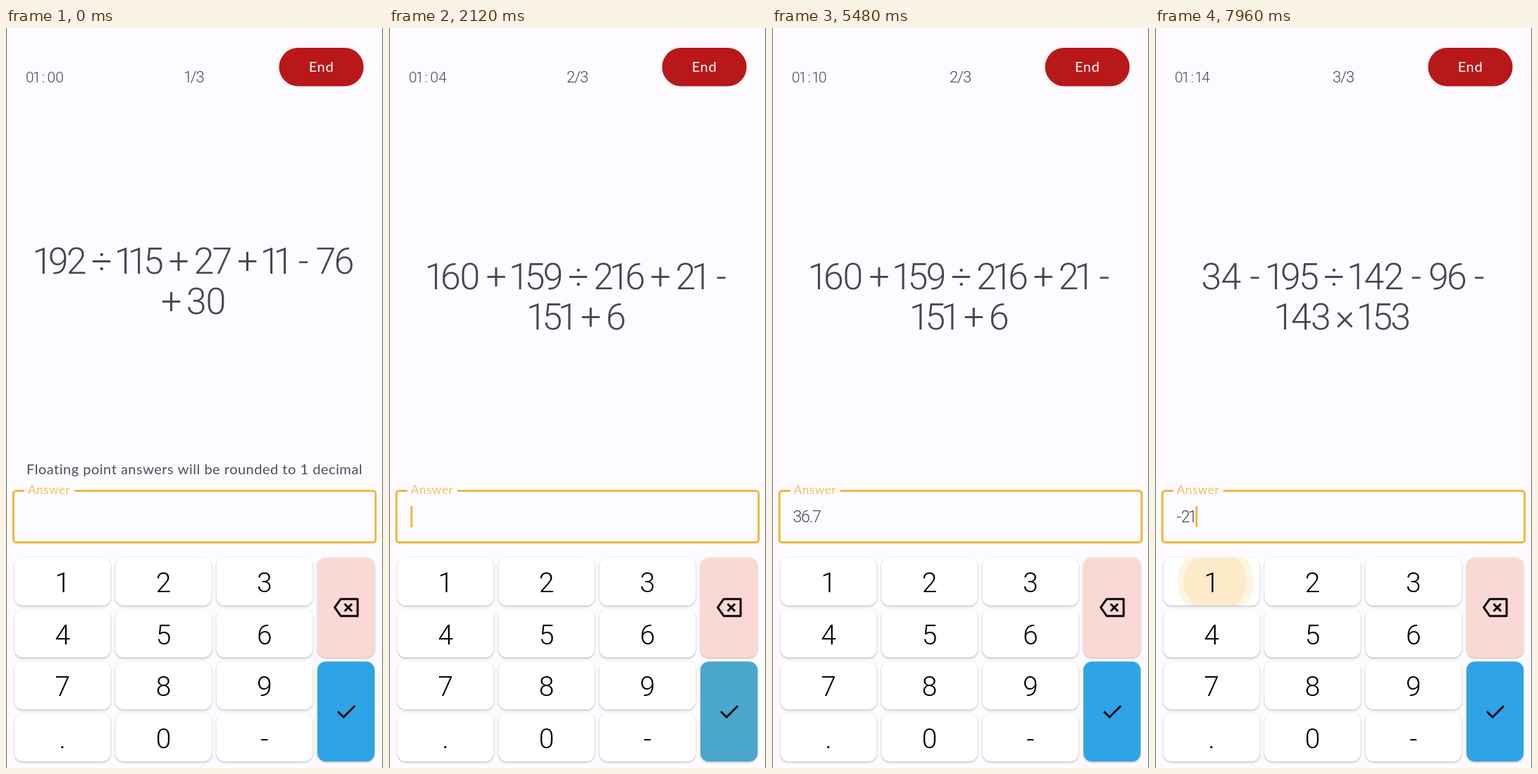
Animation, 535 px wide and 1048 px high, one loop 8 s. Source, as an HTML page with a canvas:

```html
<!DOCTYPE html>
<html>
<head>
<meta charset="utf-8">
<style>
html, body { margin: 0; width: 100%; height: 100%; overflow: hidden; background: #fdfbff }
canvas { display: block }
</style>
</head>
<body>
<canvas id="stage" width="535" height="1048"></canvas>
<script>
const ctx = document.getElementById('stage').getContext('2d');
const LOOP = 8000, BLINK = 290, GOLD = '#efb844', INK = '#48464b';

// Presses: time and key; "ok" submits the answer.
const PRESSES = [
  [220, '-'], [590, '6'], [920, '.'], [1330, '3'], [1960, 'ok'],
  [3700, '3'], [4440, '6'], [4720, '.'], [5130, '7'], [5605, 'ok'],
  [6700, '-'], [7300, '2'], [7880, '1']
];
const QUESTIONS = [
  ['192 ÷ 115 + 27 + 11 - 76', '+ 30'],
  ['160 + 159 ÷ 216 + 21 -', '151 + 6'],
  ['34 - 195 ÷ 142 - 96 -', '143 × 153']
];

const KEYS = {};
[...'123456789.0-'].forEach((label, i) => {
  KEYS[label] = { x: 12 + i % 3 * 143.3, y: 750 + Math.floor(i / 3) * 73.6, w: 136.5, h: 68, fill: '#fff', label };
});
KEYS.del = { x: 442, y: 750, w: 81, h: 141.5, fill: '#fad8d5' };
KEYS.ok = { x: 442, y: 897.3, w: 81, h: 141.5, fill: '#2ea3e5' };

// Proportional figure spacing, in em
const ADVANCE = { 1: .365, 0: .56, 4: .577, ' ': .207, '-': .308, '.': .19, ':': .52, '/': .365, '+': .46, '÷': .46, '×': .4 };
const advance = c => ADVANCE[c] || .5;
const widthOf = (text, size) => [...text].reduce((sum, c) => sum + advance(c) * size, 0);

function text(str, x, y, font, color, align = 'left', spacing = 0) {
  ctx.font = font;
  ctx.fillStyle = color;
  ctx.textAlign = align;
  ctx.letterSpacing = spacing + 'px';
  ctx.fillText(str, x, y);
}

function figures(str, x, y, size, centered) {
  if (centered) x -= widthOf(str, size) / 2;
  for (const c of str) {
    const w = advance(c) * size;
    text(c, x + w / 2, y, `300 ${size}px Roboto, sans-serif`, INK, 'center');
    x += w;
  }
}

function box(x, y, w, h, r) {
  ctx.beginPath();
  ctx.roundRect(x, y, w, h, r);
}

function line(points, close) {
  ctx.beginPath();
  points.forEach(([x, y]) => ctx.lineTo(x, y));
  if (close) ctx.closePath();
  ctx.stroke();
}

function disc(x, y, r) {
  ctx.beginPath();
  ctx.arc(x, y, r, 0, Math.PI * 2);
  ctx.fill();
}

function ripple(key, age) {
  const fade = Math.min(1, (220 - age) / 120);
  const r = 10 + .54 * age;
  const cx = key.x + key.w / 2, cy = key.y + key.h / 2;
  const shift = key.label ? 5 : 0;
  ctx.save();
  box(key.x, key.y, key.w, key.h, 12);
  ctx.clip();
  ctx.fillStyle = GOLD;
  ctx.globalAlpha = .16 * fade;
  disc(cx + shift + 1, cy, r);
  disc(cx + shift, cy, r * .83);
  ctx.restore();
}

function drawKeys(t) {
  for (const key of Object.values(KEYS)) {
    ctx.save();
    ctx.shadowColor = 'rgba(0,0,0,.27)';
    ctx.shadowBlur = 3;
    ctx.shadowOffsetY = 1.3;
    ctx.fillStyle = key.fill;
    box(key.x, key.y, key.w, key.h, 12);
    ctx.fill();
    ctx.restore();
  }
  for (const [at, id] of PRESSES) {
    if (t >= at && t < at + 220) ripple(KEYS[id], t - at);
  }
  for (const { x, y, w, label } of Object.values(KEYS)) {
    if (label) text(label, x + w / 2, y + 49, '300 39px Roboto, sans-serif', '#000', 'center');
  }
  ctx.strokeStyle = '#0a0a0a';
  ctx.lineWidth = 3;
  ctx.lineJoin = 'round';
  line([[466.5, 820.7], [475, 808.7], [499, 808.7], [499, 832.7], [475, 832.7]], true);
  line([[480.5, 815.5], [491, 826]]);
  line([[491, 815.5], [480.5, 826]]);
  ctx.lineJoin = 'miter';
  line([[471, 968], [479, 976], [495, 960]]);
}

function drawField(answer, cursor) {
  ctx.strokeStyle = GOLD;
  ctx.lineWidth = 3;
  box(10.5, 655.5, 514, 73, 4);
  ctx.stroke();
  ctx.fillStyle = '#fdfbff';
  ctx.fillRect(26, 650, 71, 10);
  text('Answer', 31, 660, '17px Lato, sans-serif', '#e9c364', 'left', .6);
  figures(answer, 30.5, 700, 23);
  if (cursor) {
    ctx.fillStyle = GOLD;
    ctx.fillRect(30.5 + widthOf(answer, 23), 677, 3, 30);
  }
}

function draw(t) {
  let answer = '', question = 0, edited = -BLINK;
  for (const [at, id] of PRESSES) {
    if (at > t) break;
    edited = at;
    if (id === 'ok') { answer = ''; question++; }
    else answer += id;
  }
  const seconds = String(Math.floor((t + 540) / 580)).padStart(2, '0');
  const cursor = Math.floor((t - edited) / BLINK) % 2 === 0;

  ctx.fillStyle = '#fdfbff';
  ctx.fillRect(0, 0, 535, 1048);
  ctx.fillStyle = '#666';
  ctx.fillRect(0, 0, 1, 1048);
  ctx.fillRect(534, 0, 1, 1048);

  figures('01:' + seconds, 28, 76.5, 21);
  figures(`${question + 1}/3`, 267.5, 77, 22, true);
  ctx.fillStyle = '#b91819';
  box(387.5, 28, 120, 54.5, 27.2);
  ctx.fill();
  text('End', 447.5, 62, '20px Lato, sans-serif', '#fff', 'center', .7);

  const top = question ? 370 : 348;
  QUESTIONS[question].forEach((row, i) => figures(row, 267.5, top + i * 57, 52, true));
  if (!question) {
    text('Floating point answers will be rounded to 1 decimal', 267.5, 631.5,
      '20px Lato, sans-serif', '#514e54', 'center', .5);
  }
  drawField(answer, cursor);
  drawKeys(t);
}

const start = performance.now();
function tick() {
  draw((performance.now() - start) % LOOP);
  requestAnimationFrame(tick);
}
tick();
</script>
</body>
</html>
```
